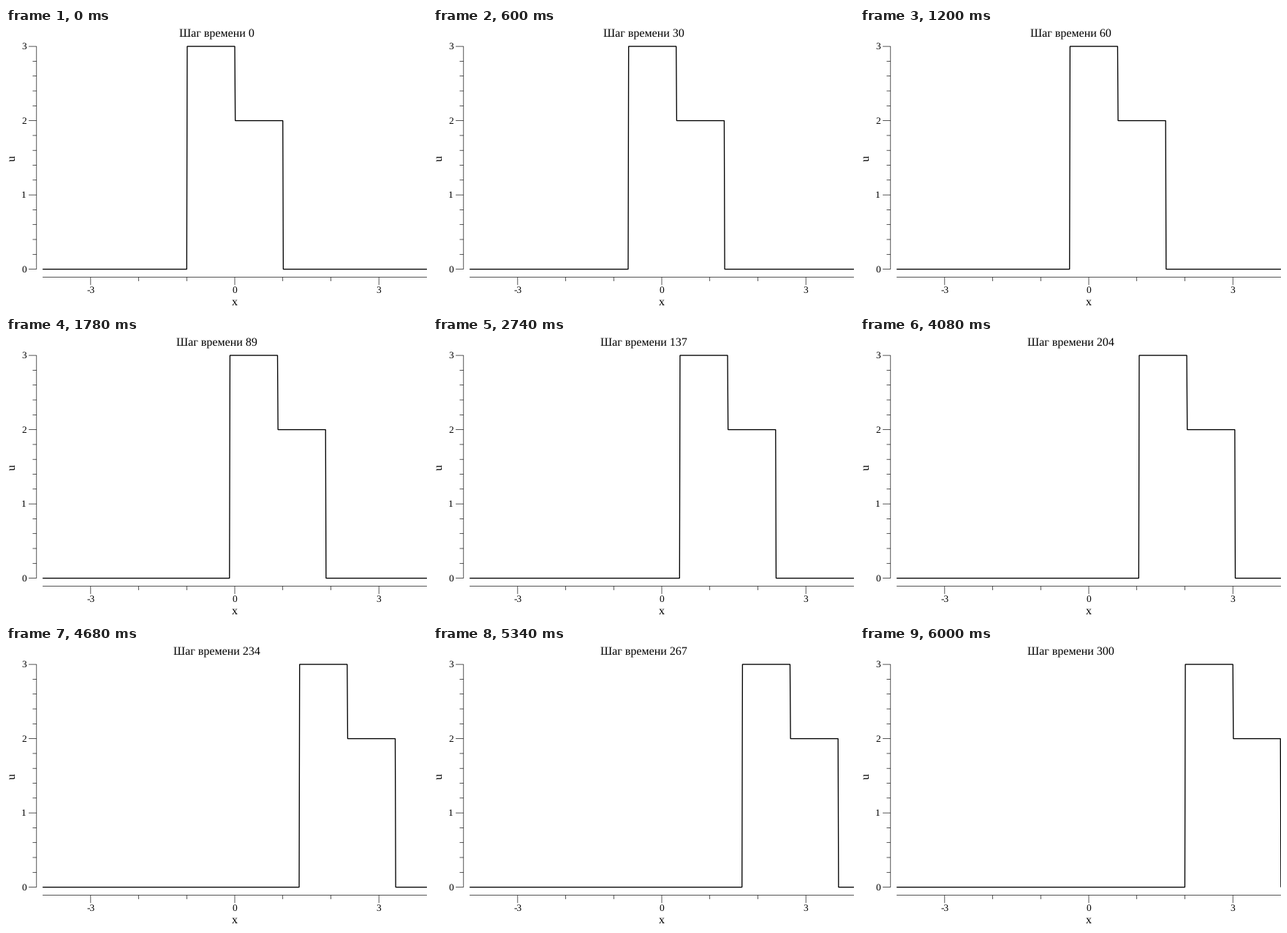
Write a matplotlib script that moves like this. It is 576 px wide and 384 px high and loops after 6.02 s.

```python
import matplotlib.pyplot as plt
import numpy as np
from matplotlib.animation import FuncAnimation

W, H, DPI = 576, 384, 96
STEPS, DX = 301, 0.01
X_MAX = 4.0

plt.rcParams.update({
    "font.family": "Liberation Serif",
    "text.hinting": "none",
    "axes.unicode_minus": False,
})

fig = plt.figure(figsize=(W / DPI, H / DPI), dpi=DPI, facecolor="white")
ax = fig.add_axes([0, 0, 1, 1])
ax.set_xlim(0, W)
ax.set_ylim(H, 0)
ax.axis("off")


def px(x):
    return 313 + 65.72 * np.asarray(x)


def py(u):
    return 329.6 - 101.5 * np.asarray(u)


def stroke(xs, ys, width):
    line, = ax.plot(xs, ys, color="black", lw=width, snap=False,
                    solid_capstyle="butt", solid_joinstyle="miter")
    return line


def label(x, y, s, size, ha="center", **kw):
    return ax.text(x, y, s, fontsize=size, color="black",
                   ha=ha, va="baseline", **kw)


AXIS_X, AXIS_Y = 41.8, 340.6
MAJOR, MINOR = 10.67, 5.33

# Horizontal axis
stroke(px([-X_MAX, X_MAX]), [AXIS_Y, AXIS_Y], 0.5)
for k in range(-3, 4):
    major = k % 3 == 0
    stroke([px(k)] * 2, [AXIS_Y, AXIS_Y + (MAJOR if major else MINOR)], 0.5)
    if major:
        label(px(k), 362, str(k), 10)
label(px(0), 379, "x", 12)

# Vertical axis
stroke([AXIS_X, AXIS_X], py([0, 3]), 0.5)
for k in range(16):
    y, major = py(k / 5), k % 5 == 0
    stroke([AXIS_X - (MAJOR if major else MINOR), AXIS_X], [y, y], 0.5)
    if major:
        label(28, y + 4, str(k // 5), 10, ha="right")
label(13, 177.5, "u", 12, rotation=90, rotation_mode="anchor")

title = label(W / 2, 12.7, "", 12)
curve = stroke([], [], 1)

LEVELS = py([0, 0, 3, 3, 2, 2, 0, 0])


def update(step):
    s = step * DX
    # The last grid point is held at zero
    right = min(1 + s, X_MAX - DX)
    xs = [-X_MAX, -1 + s, -1 + s + DX, s, s + DX, right, right + DX, X_MAX]
    curve.set_data(px(xs), LEVELS)
    title.set_text(f"Шаг времени {step}")
    return curve, title


anim = FuncAnimation(fig, update, frames=STEPS, interval=20,
                     repeat=True, repeat_delay=0, blit=False)
plt.show()
```
